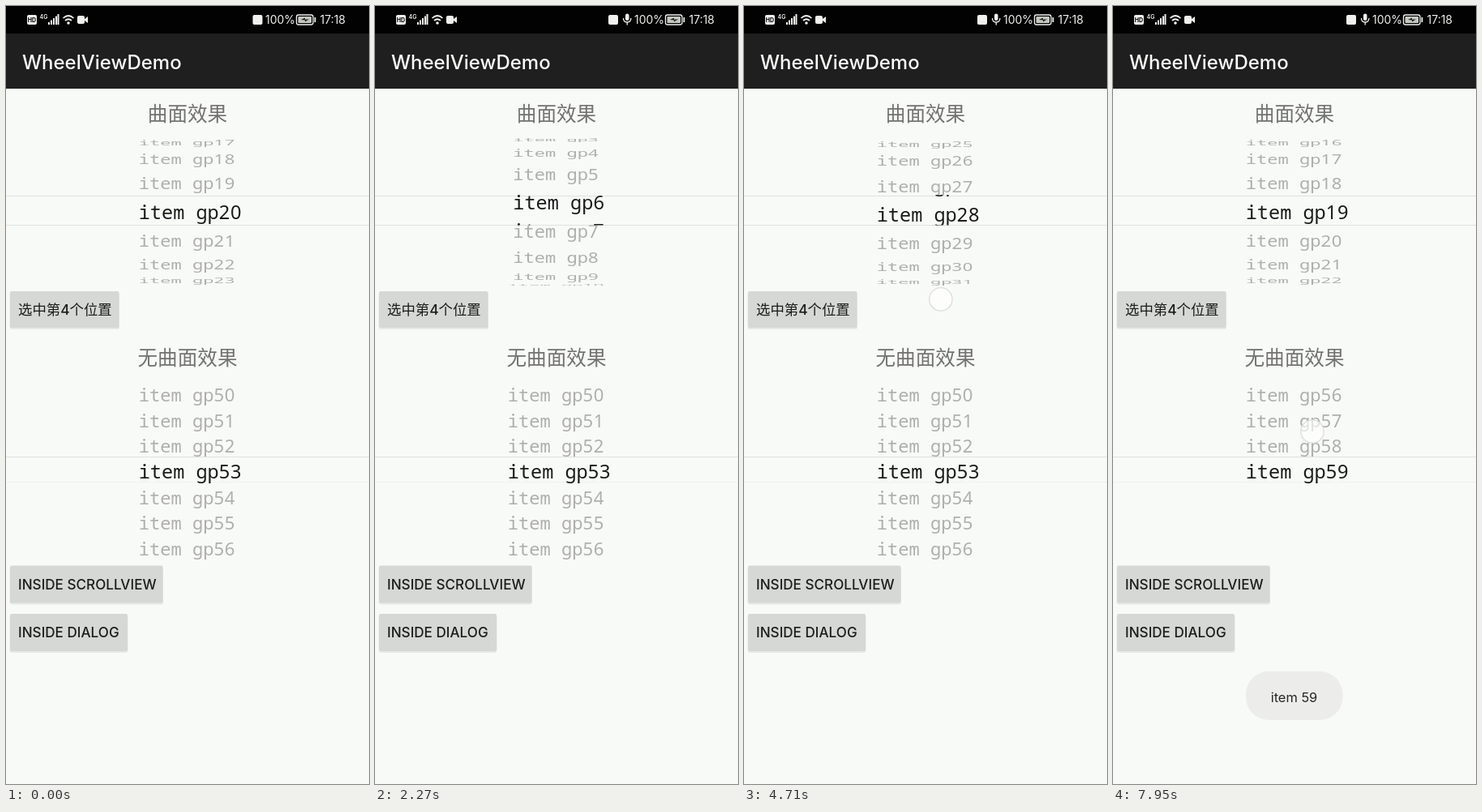
An HTML page that plays this animation: 448x960 px, repeating every 7990 ms.

```html
<!DOCTYPE html>
<html lang="zh">
<head>
<meta charset="utf-8">
<title>WheelViewDemo</title>
<style>
  html, body { margin: 0; width: 100%; height: 100%; overflow: hidden; background: #f8faf7; }
  svg { display: block; width: 100%; height: 100%; }
  text { font-family: Inter, "Noto Sans CJK SC", "Noto Sans CJK", sans-serif; }
  .head { font-size: 24.6px; fill: #72726e; text-anchor: middle; }
  .btn { font-size: 17.1px; font-weight: 500; fill: #1c1c1c; }
  .cjk { font-size: 17.4px; }
  .bar { font-size: 14px; fill: #f0f0ee; }
  .item { font-family: "Noto Sans Mono", monospace; }
  .item tspan { font-family: "Noto Sans", sans-serif; letter-spacing: .028em; }
  .dim { font-size: 22.1px; fill: #afafad; }
  .sel { font-size: 23.6px; fill: #1a1a1a; }
</style>
</head>
<body>
<svg viewBox="0 0 448 960">
  <defs>
    <clipPath id="curveSel"><rect y="233" width="448" height="37.5"/></clipPath>
    <clipPath id="curveDim"><path d="M0 160H448V233H0zM0 270.5H448V345H0z"/></clipPath>
    <clipPath id="flatSel"><rect y="560" width="448" height="31"/></clipPath>
    <clipPath id="flatDim"><path d="M0 465H448V560H0zM0 591H448V685H0z"/></clipPath>
  </defs>
  <rect width="448" height="960" fill="#f8faf7"/>
  <rect width="448" height="34" fill="#020202"/>
  <rect y="34" width="448" height="68" fill="#1f1f1f"/>
  <text x="20" y="78" font-size="24" font-weight="500" fill="#fcfcfa">WheelViewDemo</text>

  <g fill="#f0f0ee">
    <rect x="26" y="11" width="12" height="12" rx="2"/>
    <text x="32" y="20" font-size="7" font-weight="700" text-anchor="middle" fill="#020202">HD</text>
    <text x="41.500" y="16" font-size="7" font-weight="600">4G</text>
    <path d="M52 20h2v3h-2zM55 17.500h2v5.500h-2zM58 15h2v8h-2zM61 12.500h2v10.500h-2zM63.500 10h2v13h-2z"/>
    <path d="M70.500 15q6.500-6 13 0M73 18q4-3.500 8 0" fill="none" stroke="#f0f0ee" stroke-width="1.700"/>
    <circle cx="77" cy="21" r="1.800"/>
    <rect x="88" y="12" width="9" height="10" rx="2"/>
    <path d="M97 16l4-3v8l-4-3z"/>
    <rect id="chip" y="11" width="12" height="12" rx="2"/>
    <g id="mic">
      <rect x="309" y="9.500" width="4.500" height="8.500" rx="2.200"/>
      <path d="M306.500 15q0 5 4.700 5t4.700-5M311.200 20v3.500" fill="none" stroke="#f0f0ee" stroke-width="1.300"/>
    </g>
    <rect x="358.500" y="11" width="20.500" height="12" rx="2.500" fill="none" stroke="#f0f0ee" stroke-width="1.300"/>
    <rect x="360.500" y="13" width="16.500" height="8" rx="1" fill="#c4c8c0"/>
    <rect x="380.500" y="14" width="1.800" height="6"/>
    <path d="M364 17l5-2.500v2h5l-5 3v-2z" fill="#222"/>
    <text class="bar" x="320" y="22">100%</text>
    <text class="bar" x="387.500" y="22">17:18</text>
  </g>

  <text class="head" x="224" y="142">曲面效果</text>
  <text class="head" x="224" y="443">无曲面效果</text>
  <g id="buttons"></g>
  <g stroke="#dde2e0">
    <path d="M0 234.500H448M0 270.500H448M0 556.500H448"/>
    <path d="M0 587.500H448" opacity=".35"/>
  </g>
  <g id="wheels"></g>
  <g id="toast">
    <rect x="164" y="821" width="119.500" height="60" rx="28" fill="#ecedeb"/>
    <text id="note" x="223.500" y="858.500" font-size="16.400" fill="#262626" text-anchor="middle"></text>
  </g>
  <circle id="finger" r="14.200" fill="#fff" fill-opacity=".65" stroke="#dcdfdb" stroke-width="1.300"/>
</svg>
<script>
const LOOP = 7990, COUNT = 60;
const $ = id => document.getElementById(id);

function add(parent, tag, attrs, text) {
  const el = document.createElementNS("http://www.w3.org/2000/svg", tag);
  for (const k in attrs) el.setAttribute(k, attrs[k]);
  if (text) el.textContent = text;
  parent.appendChild(el);
  return el;
}

function button(y, w, h, label, cls) {
  const g = $("buttons");
  add(g, "rect", { x: 4.5, y: y + 1, width: w + 1, height: h + 1, rx: 3, fill: "#e6e8e5" });
  add(g, "rect", { x: 5, y, width: w, height: h, rx: 2, fill: "#d5d8d5" });
  add(g, "text", { x: 15, y: y + h / 2 + 6.3, class: cls }, label);
}
button(352, 134.5, 45, "选中第4个位置", "btn cjk");
button(690.5, 188.5, 46, "INSIDE SCROLLVIEW", "btn");
button(750, 145, 46, "INSIDE DIALOG", "btn");

// Places an item d rows away from the selected one: [offset, vertical scale]
const ANGLE = 0.394, RADIUS = 92;
const curve = d => [RADIUS * Math.sin(d * ANGLE), Math.abs(d * ANGLE) < 1.5 ? Math.cos(d * ANGLE) : 0];
const flat = d => [31.6 * d, 1];

function wheel(name, cy, place) {
  const layers = ["dim", "sel"].map(kind => {
    const id = name + (kind === "dim" ? "Dim" : "Sel");
    const g = add($("wheels"), "g", { "clip-path": `url(#${id})` });
    const rows = Array.from({ length: 9 }, () => {
      const el = add(g, "text", { class: "item " + kind }, "item gp");
      return { el, num: add(el, "tspan", {}) };
    });
    return { rows, base: kind === "dim" ? 7.9 : 8.4 };
  });
  return pos => {
    const first = Math.round(pos) - 4;
    for (const { rows, base } of layers) rows.forEach(({ el, num }, i) => {
      const n = first + i, [dy, scale] = place(n - pos);
      const shown = n >= 0 && n < COUNT && scale > 0;
      el.setAttribute("display", shown ? "inline" : "none");
      if (!shown) return;
      num.textContent = n;
      const x = 223.3 - (7 + String(n).length) * 13.25 / 2;
      el.setAttribute("transform", `translate(${x} ${cy + dy}) scale(1 ${scale}) translate(0 ${base})`);
    });
  };
}
const setCurve = wheel("curve", 254.2, curve);
const setFlat = wheel("flat", 575, flat);

const line = u => u;
const fling = u => 1 - (1 - u) ** 3;
const caught = u => u * (1.6 - 0.6 * u); // a fling stopped by the next touch

// Keys are [time, value, easing towards this key]
function track(keys, t) {
  let i = 1;
  while (i < keys.length && t >= keys[i][0]) i++;
  const a = keys[i - 1], b = keys[i];
  if (!b) return a[1];
  return a[1] + (b[1] - a[1]) * (b[2] || line)((t - a[0]) / (b[0] - a[0]));
}

const curvePos = [[0, 20], [1320, 20], [1580, 14], [1670, 11.92], [2640, 6, fling],
  [2900, 10.35], [2950, 11.5], [3270, 16.8, caught], [3520, 22], [4480, 33, caught],
  [4710, 27.92], [4735, 27.4], [5800, 19, fling]];
const flatPos = [[0, 53], [6800, 53], [7050, 56.6], [7500, 59, fling]];

// Touches: [start, end, x0, y0, x1, y1]
const touches = [
  [1320, 1610, 255, 170, 268, 383],
  [2640, 2950, 290, 306, 305.5, 118],
  [3270, 3520, 295, 294, 306, 106],
  [4480, 4735, 232, 178, 244, 381],
  [6800, 7050, 240, 628, 246, 514],
  [7800, 7950, 250, 560, 246, 525]
];
const clamp = v => Math.min(1, Math.max(0, v));

function setFinger(t) {
  const hit = touches.find(([a, b]) => t >= a && t < b + 100);
  $("finger").setAttribute("display", hit ? "inline" : "none");
  if (!hit) return;
  const [a, b, x0, y0, x1, y1] = hit, u = clamp((t - a) / (b - a));
  $("finger").setAttribute("cx", x0 + (x1 - x0) * u);
  $("finger").setAttribute("cy", y0 + (y1 - y0) * u);
  $("finger").setAttribute("opacity", 1 - clamp((t - b) / 100));
}

function draw(t) {
  setCurve(track(curvePos, t));
  setFlat(track(flatPos, t));
  setFinger(t);
  const late = t >= 7550;
  $("note").textContent = late ? "item 59" : "item 19";
  $("toast").setAttribute("opacity", clamp((t - (late ? 7550 : 5980)) / 200));
  const recording = t >= 400;
  $("mic").setAttribute("display", recording ? "inline" : "none");
  $("chip").setAttribute("x", recording ? 288 : 304.5);
}

const start = performance.now();
function tick() {
  draw((performance.now() - start) % LOOP);
  requestAnimationFrame(tick);
}
tick();
</script>
</body>
</html>
```
